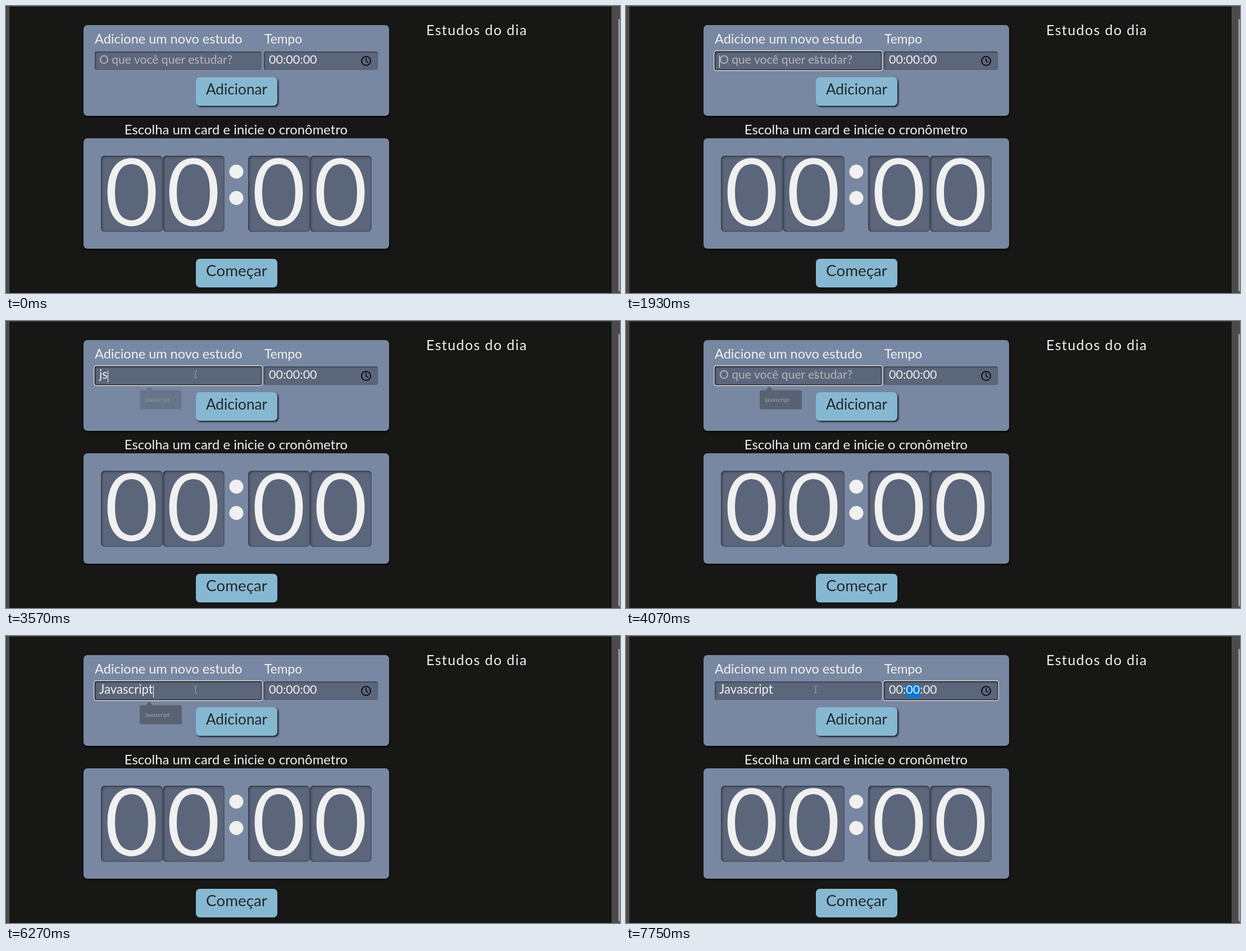
Animation of 1093 by 512 pixels, one loop 8000 ms. Source, as an HTML page:

```html
<!DOCTYPE html>
<html lang="pt">
<head>
<meta charset="utf-8">
<title>Estudos do dia</title>
<style>
  html, body { margin: 0; width: 100%; height: 100%; overflow: hidden; background: #171715; }
  #stage { position: absolute; left: 0; top: 0; width: 1093px; height: 512px; overflow: hidden; }
  #stage div { position: absolute; box-sizing: border-box; }
  .edge { background: #4b4b4a; }
  .thumb { background: #9b9b9b; border-radius: 2px; }
  .panel { background: #7888a2; border-radius: 7px; box-shadow: 1px 2px 3px #050505; }
  .field { background: #5c667b; border-radius: 4px; box-shadow: inset 1px 1px 3px #2c313d; }
  .cell { background: #5c667b; border-radius: 7px; box-shadow: inset 1px 1px 4px #20242d; }
  .button { background: #86b9d1; border-radius: 7px; box-shadow: 2px 2px 3px #15181d; }
  svg { position: absolute; left: 0; top: 0; }
  text { font-family: Lato, sans-serif; fill: #f0f0f0; white-space: pre; }
  .ink { fill: #24272c; }
  .mid { text-anchor: middle; }
  .digit { font-size: 169px; text-anchor: middle; stroke: #5c667b; stroke-width: 2.2px; }
</style>
</head>
<body>
<div id="stage">
  <svg id="art" width="1093" height="512" viewBox="0 0 1093 512">
    <g id="labels"></g>
    <circle cx="410" cy="295.5" r="12.5" fill="#f0f0f0"/>
    <circle cx="410" cy="342.5" r="12.5" fill="#f0f0f0"/>
    <g id="ring" fill="none">
      <rect x="-.3" y="-.3" height="33.600" rx="3.500" stroke="#101216" stroke-width="2"/>
      <rect x="-1.100" y="-1.100" height="35.200" rx="4" stroke="#fff" stroke-width="1.200"/>
    </g>
    <rect id="mark" y="87" width="26" height="23" fill="#0078d7"/>
    <text x="468" y="103" font-size="21.5">00:00:00</text>
    <g fill="none" stroke="#0b0b0c" stroke-width="2">
      <circle cx="641" cy="98" r="8"/>
      <path d="M641 93v5.4l3.6 2.4" stroke-width="1.7"/>
    </g>
    <text id="hint" x="166" y="103" font-size="21.1" style="fill:#b3b5b9">O que você quer estudar?</text>
    <text id="typed" x="166" y="103" font-size="22.2"></text>
    <rect id="caret" y="88" width="1" height="22" fill="#f4f4f4"/>
    <g id="tip">
      <path d="M240 123h8l6.500-7 6.500 7h50a3 3 0 0 1 3 3v29a3 3 0 0 1-3 3h-71a3 3 0 0 1-3-3v-29a3 3 0 0 1 3-3z" fill="#292a2d"/>
      <text x="247" y="144" font-size="10" style="font-family:'Open Sans',sans-serif">Javascript</text>
    </g>
    <path id="arrow" d="M.5.5v12.200l2.900-2.700 2 4.600 1.900-.8-2-4.500h4.200z" fill="#fff" stroke="#111" stroke-width=".8"/>
    <path id="beam" d="M-2.500-6h2M.5-6h2M0-5.500v11M-2.500 6h2M.5 6h2" fill="none" stroke="#a8a9a6"/>
  </svg>
</div>
<script>
const LOOP = 8000;
const $ = id => document.getElementById(id);
const stage = $('stage'), art = $('art');

function box(cls, x, y, right, bottom) {
  const el = document.createElement('div');
  el.className = cls;
  el.style.cssText = `left:${x}px;top:${y}px;width:${right - x}px;height:${bottom - y}px`;
  stage.insertBefore(el, art);
}

function label(str, x, y, size, cls = '') {
  const el = document.createElementNS('http://www.w3.org/2000/svg', 'text');
  el.textContent = str;
  el.setAttribute('x', x);
  el.setAttribute('y', y);
  if (size) el.setAttribute('font-size', size);
  el.setAttribute('class', cls);
  $('labels').append(el);
  return el;
}

box('edge', 0, 0, 1093, 1);
box('edge', 0, 0, 6, 512);
box('edge', 1078, 0, 1093, 512);
box('thumb', 1090, 23, 1093, 509);
box('panel', 138, 34, 682, 196);
box('panel', 138, 236, 682, 433);
box('button', 338, 127, 483, 178);
box('button', 338, 451, 483, 502);
box('field', 158, 81, 455, 114);
box('field', 459, 81, 662, 114);

for (const x of [169, 279, 431, 541]) {
  box('cell', x, 267, x + 110, 403);
  label('0', x + 54.5, 392.6, 0, 'digit');
}
label('Adicione um novo estudo', 158, 67, 23.5);
label('Tempo', 460, 67, 22.8);
label('Adicionar', 410.5, 158, 26.2, 'ink mid');
label('Começar', 410.5, 482, 27.8, 'ink mid');
label('Escolha um card e inicie o cronômetro', 409.5, 229, 23.9, 'mid');
label('Estudos do dia', 748, 52, 25).style.letterSpacing = '1.4px';

// [time, text in the study field]
const typing = [
  [0, ''], [2780, 'j'], [3270, 'js'], [3820, 'j'], [3870, ''], [4470, 'J'], [4670, 'Ja'],
  [4820, 'Jav'], [4970, 'Java'], [5370, 'Javas'], [5520, 'Javasc'], [5770, 'Javascr'],
  [5870, 'Javascri'], [6070, 'Javascrip'], [6170, 'Javascript']
];
// Suggestion: [appears, starts to fade]
const tips = [[2780, 3370], [3820, 3920], [4470, 6120]];
const FADE = 250;

// Pointer: [start, end, steps, from, to]
const moves = [
  [250, 400, 4, [944, 486], [797, 160]],
  [650, 800, 4, [797, 160], [415, 68]],
  [1050, 1390, 8, [415, 68], [337, 101]],
  [1540, 1590, 2, [337, 101], [337, 95]]
];

const show = (el, on) => el.style.display = on ? '' : 'none';

function pointer(t) {
  let at = null;
  moves.forEach(([start, end, steps, from, to], i) => {
    if (t < start) return;
    const n = Math.min(steps - 1, Math.floor((t - start) / (end - start) * (steps - 1) + 1e-6));
    const p = i ? (n + 1) / steps : n / (steps - 1);
    const k = 1 - (1 - p) ** 1.5;
    at = from.map((v, j) => Math.round(v + (to[j] - v) * k));
  });
  return at;
}

function drawPointer(t) {
  const at = pointer(t);
  const inField = at && at[1] > 81 && at[1] < 114 && at[0] < 455;
  show($('arrow'), at && !inField);
  show($('beam'), inField);
  if (at) {
    const shift = inField ? .5 : 0;
    $(inField ? 'beam' : 'arrow').setAttribute('transform', `translate(${at[0] + shift} ${at[1] + shift})`);
  }
}

function drawTip(t) {
  const tip = tips.find(([start, fade]) => t >= start && t < fade + FADE);
  show($('tip'), tip);
  if (!tip) return;
  const stepped = Math.floor(Math.max(0, t - tip[1]) / 50 + 1e-6) * 50;
  const left = 1 - stepped / FADE;
  const scale = .96 + .04 * left;
  $('tip').setAttribute('opacity', left);
  $('tip').setAttribute('transform', `translate(275.5 140.5) scale(${scale}) translate(-275.5 -140.5)`);
}

function drawFocus(t) {
  const inTime = t >= 6660;
  const [x, width] = inTime ? [459, 203] : [158, 297];
  show($('ring'), t >= 1930);
  $('ring').setAttribute('transform', `translate(${x} 81)`);
  for (const rect of $('ring').children)
    rect.setAttribute('width', width - 2 * rect.getAttribute('x'));
  show($('mark'), inTime);
  $('mark').setAttribute('x', t < 7750 ? 467.5 : 497.5);
}

function draw(t) {
  const text = typing.filter(([at]) => t >= at).pop()[1];
  $('typed').textContent = text;
  show($('hint'), !text);

  const blink = t >= 1930 && t < 2420;
  show($('caret'), blink || (text && t < 6660));
  const width = text ? $('typed').getComputedTextLength() : 0;
  $('caret').setAttribute('x', Math.round(166 + width));

  drawFocus(t);
  drawTip(t);
  drawPointer(t);
}

const begin = performance.now();
function tick() {
  draw((performance.now() - begin) % LOOP);
  requestAnimationFrame(tick);
}
tick();
</script>
</body>
</html>
```
